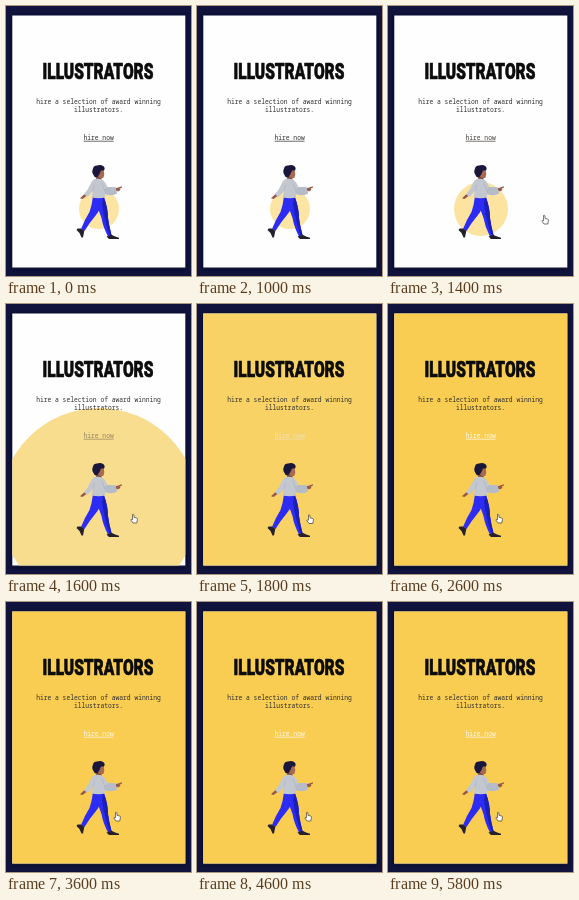
These frames come from a looping animation (185 by 270 pixels, 6000 ms). An HTML page:

```html
<!DOCTYPE html>
<html lang="en">
<head>
<meta charset="utf-8">
<title>Illustrators card</title>
<style>
  html, body { margin: 0; width: 100%; height: 100%; overflow: hidden; background: #10143c; }
  svg { display: block; width: 185px; height: 270px; }
  text { text-anchor: middle; }
  .title { font: 900 15.5px Roboto, sans-serif; fill: #0c0c0c; stroke: #0c0c0c; stroke-width: .5; stroke-linejoin: round; }
  .copy { font: 6.3px "Noto Sans Mono", "DejaVu Sans Mono", monospace; fill: #303030; }
  .line { fill: none; stroke-linecap: round; stroke-linejoin: round; }
</style>
</head>
<body>
<svg viewBox="0 0 185 270">
  <defs>
    <clipPath id="card"><rect x="6.3" y="9.5" width="173" height="252"/></clipPath>
    <filter id="soft"><feGaussianBlur stdDeviation="2"/></filter>
  </defs>
  <rect width="185" height="270" fill="#10143c"/>
  <rect x="6" y="10" width="174" height="253" fill="#0a0c2a" filter="url(#soft)"/>
  <g clip-path="url(#card)">
    <rect width="185" height="270" fill="#fefefe"/>
    <circle id="disc" cx="93" cy="203" r="20"/>
  </g>

  <!-- a tall display face -->
  <text class="title" transform="translate(92 72.7) scale(1 1.37)">ILLUSTRATORS</text>
  <text class="copy" x="92.5" y="97.8">hire a selection of award winning</text>
  <text class="copy" x="92.5" y="106">illustrators.</text>
  <g id="link">
    <text class="copy" x="92.6" y="133.9" style="fill:inherit">hire now</text>
    <rect x="77.6" y="134.8" width="30" height=".7"/>
  </g>

  <g id="walker">
    <path d="M87 190 L98 190 Q95 203 90 209 Q84 216 78.5 225 L75 223 Q79 213 83.5 206 Q86 199 87 190Z" fill="#2c2cf4"/>
    <path d="M88 190 L97.5 190 Q102 202 102 212 Q103 220 105.5 229 L102 230.5 Q97 221 95.5 212 Q93 203 88 195Z" fill="#2c2cf4"/>
    <path d="M97.5 190 Q102 202 102 212 Q103 220 105.5 229 L104 230 Q98.5 216 96 198Z" fill="#1a1fb8"/>
    <path d="M74.8 222.5 L78.3 224.8 L77 231.5 L75.5 231.5 L73.5 227 L70.5 224 L71.5 222.5Z" fill="#25202c"/>
    <path d="M100.5 230.5 L105.5 228.8 Q109 231 113 231.8 L113 233 L103 233Z" fill="#25202c"/>
    <path d="M90.5 168 L95.5 170 L95.5 175 L90 175Z" fill="#7d4c3f"/>
    <path d="M92 163 L97.5 163 L98.3 168.5 L97.3 172 L94 172 L91 169.5Z" fill="#a76a50"/>
    <path d="M91.5 171 Q88.5 172.5 87.5 169 Q85.3 166 87 162.5 Q87.5 159.5 91 159.5 Q94.5 158 97.5 160.2 Q99.5 162 98 164.5 L95 164.5 L93.5 168Z" fill="#19183c"/>
    <path d="M108 182.5 L111.5 181.8 L115.8 180.3 L116 181.5 L113.5 182.7 L114.5 183.7 L112.5 185.2 L109 185Z" fill="#95594a"/>
    <path d="M78.5 188 L80.5 190 L76.5 193 L74 192.3Z" fill="#95594a"/>
    <path d="M89 173 Q93 172 97 174 Q100 177 101.5 181 L109.5 181.2 L111 187.5 Q105 190.5 99 188 L99 191.5 Q93 193 85.5 191.5 L87 185 L81.5 191 L78 188 Q82 184 84.5 178 Q86 174 89 173Z" fill="#c3c8d0"/>
    <path d="M101.5 181 L109.5 181.2 L111 187.5 Q105 190.5 99 188 L98 184Z" fill="#b5bbc7"/>
    <path class="line" d="M96 177 L98.5 184 M88.5 179 L87 185" stroke="#a3a9b5" stroke-width=".5"/>
  </g>

  <path id="hand" d="M-1.5 -4.5 Q-.8 -5.3 -.2 -4.4 L.2 -1.5 L2.8 -1 Q3.5 -.6 3.4 .5 L2.8 4 L-1 4 L-3.2 1 Q-3.2 -.1 -1.4 .7Z"
    fill="#fff" stroke="#3a3a3a" stroke-width=".7" stroke-linejoin="round"/>
</svg>
<script>
const LOOP = 6000, STEP = 200, START = 1200;
const [disc, link, hand] = ["disc", "link", "hand"].map(id => document.getElementById(id));

// One key per step, from START onward; the last one holds.
const radius = [20, 27, 99, 215];
const tint = ["#fce5a3", "#fce4a0", "#f9dd8e", "#f9d265", "#f9cc52"];
const ink = ["#303030", "#403d38", "#92835f", "#efe0b8", "#fffaf0"];
const place = [[182, 214], [157, 214], [128, 215], [113, 215.5], [111, 215]];

function draw(now) {
  const step = Math.floor((now % LOOP - START) / STEP);
  const at = keys => keys[Math.max(0, Math.min(step, keys.length - 1))];
  disc.setAttribute("r", at(radius));
  disc.setAttribute("fill", at(tint));
  link.setAttribute("fill", at(ink));
  hand.setAttribute("transform", `translate(${at(place)})`);
  hand.setAttribute("visibility", step < 0 ? "hidden" : "visible");
}

const begin = performance.now();
function tick() {
  draw(performance.now() - begin);
  requestAnimationFrame(tick);
}
tick();
</script>
</body>
</html>
```
